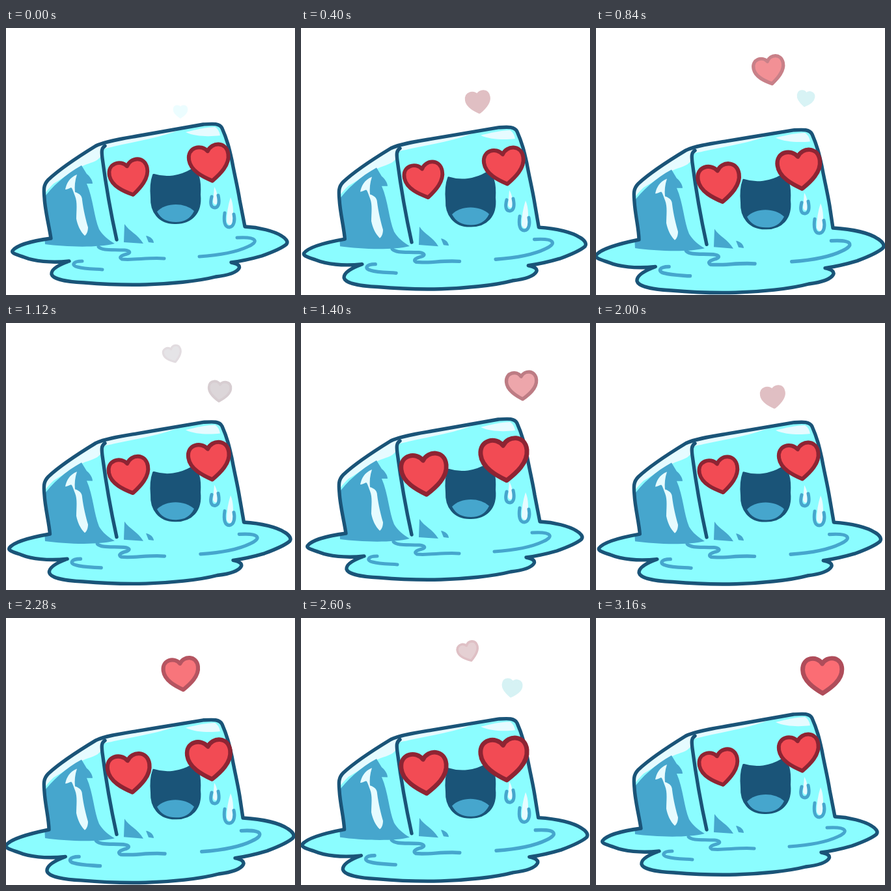
Recreate the animation shown at these times as an HTML page. Size 444 by 410 pixels, loop 3.2 s.

```html
<!DOCTYPE html>
<html lang="en">
<head>
<meta charset="utf-8">
<title>Melting ice cube</title>
<style>
  html, body { margin: 0; width: 100%; height: 100%; overflow: hidden; background: #fff; }
  svg { display: block; width: 100vw; height: 100vh; }
  path { stroke-linecap: round; stroke-linejoin: round; }
  .ink { fill: none; stroke: #1a5478; stroke-width: 5.4; }
  .ripple { fill: none; stroke: #46a6cd; stroke-width: 5; }
  .shade { fill: #46a6cd; }
  .shine { fill: #e6fbff; }
  .eye { fill: #f24b54; stroke: #8e2433; stroke-width: 6; }
  .float { stroke-width: 7; }
</style>
</head>
<body>
<svg viewBox="0 0 444 410">
  <defs>
    <clipPath id="inside"><path class="outline"/></clipPath>
    <path id="heart" d="M0-17C-8-30-30.500-28-30.500-8C-30.500 9-13 21 0 29C13 21 30.500 9 30.500-8C30.500-28 8-30 0-17Z"/>
  </defs>

  <path class="outline" fill="#8bfdff"/>
  <g clip-path="url(#inside)">
    <g class="body">
      <path class="shine" d="M56 262C60 252 66 246 73 239C90 229 108 216 122 210C134 206 143 203 146 196L149 187C152 184 158 184 165 182C200 174 240 168 272 154L145 165L50 230Z"/>
      <path class="shade" d="M56 264C70 244 92 224 116 211L124 224C129 228 133 234 133 239L124 239C134 262 135 290 143 309C148 318 158 326 167 331C140 338 90 336 60 332Z"/>
      <path class="shine" d="M91 248C93 239 97 230 109 225C106 234 105 243 106 252C113 254 117 258 117 264C119 280 123 296 126 306C126 312 124 317 121 319C114 312 110 303 108 293C108 280 110 268 106 258C103 250 102 246 100 245C97 246 94 248 91 248Z"/>
      <path class="shine" d="M276 160C292 156 308 152 321 152C326 155 328 160 329 165C313 167 291 167 276 160Z"/>
      <path class="shade" d="M182 301C190 313 202 316 211 331L181 329ZM215 319C222 320 227 325 227 330L219 329Z"/>
    </g>
    <g class="puddle">
      <path class="ripple" d="M142 336C148 342 162 340 182 341C191 342 192 345 186 347C178 349 172 352 178 355C195 357 220 352 243 354M117 358C102 358 100 365 110 367C120 370 135 370 148 371M355 322C388 320 388 329 371 336C352 345 326 349 297 351"/>
    </g>
  </g>
  <path class="outline ink"/>

  <g class="body">
    <path class="ink" d="M152 181C146 185 147 191 148 200C153 238 160 280 170 325"/>
    <path d="M227 226C246 232 268 229 286 218C297 222 298 240 297 256C300 284 284 299 261 299C235 300 223 281 224 260C223 249 223 237 227 226Z" fill="#1a5478" stroke="#1a5478" stroke-width="4"/>
    <path class="shade" d="M232 282C245 268 274 267 289 281C283 293 274 298 261 298C247 298 238 293 232 282Z"/>
    <path class="shine" d="M320 244C325 252 326 262 324 270Q320 273 318 267ZM345 260C350 270 350 290 347 302Q342 304 339 298C339 285 341 272 345 260Z"/>
    <path class="ripple" d="M316 259C313 270 315 276 321 276C328 275 328 266 326 257M336 284C334 297 336 306 343 306C351 305 352 294 350 286"/>
    <use class="eye" href="#heart"/>
    <use class="eye" href="#heart"/>
  </g>
  <use class="float" href="#heart"/>
  <use class="float" href="#heart"/>
</svg>

<script>
const all = selector => [...document.querySelectorAll(selector)];
const outlines = all('.outline'), bodies = all('.body'), puddles = all('.puddle');
const eyes = all('.eye'), floats = all('.float');

const CYCLE = 1600, STEP = 40;
const BODY_PATH = 'C66 303 60 280 59 261C58 249 57 241 65 233C84 215 112 197 138 181'
  + 'C152 174 178 170 201 166C235 160 270 154 303 148C318 147 328 146 332 154C340 172 343 185 347 203C351 225 356 245 359 264';
const PUDDLE_PATH = 'C389 306 412 312 423 319C430 323 434 328 431 332C423 339 407 345 393 350C379 354 361 358 346 360'
  + 'C356 362 360 365 358 369C354 376 339 380 322 382C295 389 250 393 215 394C177 395 144 393 120 391'
  + 'C96 390 72 386 70 378C69 370 83 363 97 358C68 361 43 358 28 352C16 348 8 346 10 342C16 334 39 327';

// Each key: time, x, y, width, rotation, fill, stroke
const FLOAT_KEYS = [
  [
    [0, 268, 128, 22, 0, 'ecfdff', 'ecfdff'],
    [400, 272, 113, 38, -8, 'e0bfc3', 'e0bfc3'],
    [640, 270, 90, 60, -6, 'fa6e74', 'b04a57'],
    [840, 266, 64, 50, -12, 'f29095', 'c88088'],
    [1000, 257, 51, 34, -18, 'e5d0d3', 'dfc0c5'],
    [1240, 255, 44, 25, -20, 'e4f8fb', 'e4f8fb']
  ],
  [
    [760, 320, 109, 24, 8, 'e4fbff', 'e4fbff'],
    [840, 322, 108, 27, 9, 'd8f3f5', 'd8f3f5'],
    [1000, 324, 107, 31, 8, 'd6f2f4', 'd6f2f4'],
    [1200, 331, 102, 40, 2, 'e0c3c7', 'd8b4ba'],
    [1400, 339, 95, 50, -4, 'eda6ab', 'bd7c84'],
    [1600, 350, 85, 69, 0, 'ff5f66', 'ab4150']
  ]
];

const lerp = (a, b, p) => a + (b - a) * p;
const smooth = (t, from, to) => {
  const p = Math.min(1, Math.max(0, (t - from) / (to - from)));
  return p * p * (3 - 2 * p);
};
const mix = (a, b, p) => 'rgb(' + [0, 2, 4].map(i =>
  Math.round(lerp(parseInt(a.substr(i, 2), 16), parseInt(b.substr(i, 2), 16), p))) + ')';

const bodyMatrix = sink => [1, .012 * sink, 0, 1, 0, 5.2 * sink];
const puddleMatrix = sink =>
  [1 + .047 * sink, 0, 0, 1 + .105 * sink, -10.3 * sink, -29.1 * sink];
const warp = (path, [a, b, c, d, e, f]) => path.replace(/(\d+) (\d+)/g, (_, x, y) =>
  `${(a * x + c * y + e).toFixed(2)} ${(b * x + d * y + f).toFixed(2)}`);

function drawBody(t) {
  const sink = smooth(t, 60, 700) - smooth(t, 840, 1400);
  const body = bodyMatrix(sink), puddle = puddleMatrix(sink);
  const left = `${69 - 3 * sink} ${323 + 2 * sink}`;
  const right = `${367 - 3 * sink} ${305 + 2 * sink}`;
  const d = `M${left}${warp(BODY_PATH, body)}L${right}${warp(PUDDLE_PATH, puddle)} ${left} ${left}Z`;
  outlines.forEach(el => el.setAttribute('d', d));
  bodies.forEach(el => el.setAttribute('transform', `matrix(${body})`));
  puddles.forEach(el => el.setAttribute('transform', `matrix(${puddle})`));
}

function drawEyes(t) {
  const beat = t % 400;
  const pulse = smooth(beat, -40, 120) * smooth(beat, 0, 50) - smooth(beat, 210, 360);
  const place = (el, x, y, size, angle) => el.setAttribute('transform',
    `translate(${x} ${y + 2 * pulse}) rotate(${angle}) scale(${size + .17 * pulse})`);
  place(eyes[0], 189.5, 228.5, .97, -12 + 6 * pulse);
  place(eyes[1], 312.5, 206, 1, -9 + 3 * pulse);
}

function drawFloat(el, keys, t) {
  const next = keys.findIndex(key => key[0] > t);
  el.style.display = next > 0 ? '' : 'none';
  if (next < 1) return;
  const a = keys[next - 1], b = keys[next];
  const p = (t - a[0]) / (b[0] - a[0]);
  const [x, y, width, angle] = [1, 2, 3, 4].map(i => lerp(a[i], b[i], p));
  el.setAttribute('transform', `translate(${x} ${y}) rotate(${angle}) scale(${width / 66})`);
  el.setAttribute('fill', mix(a[5], b[5], p));
  el.setAttribute('stroke', mix(a[6], b[6], p));
}

const start = performance.now();
function frame() {
  const elapsed = performance.now() - start;
  const t = Math.floor(elapsed / STEP) * STEP % CYCLE;
  drawBody(t);
  drawEyes(t);
  floats.forEach((el, i) => drawFloat(el, FLOAT_KEYS[i], t));
  requestAnimationFrame(frame);
}
frame();
</script>
</body>
</html>
```
